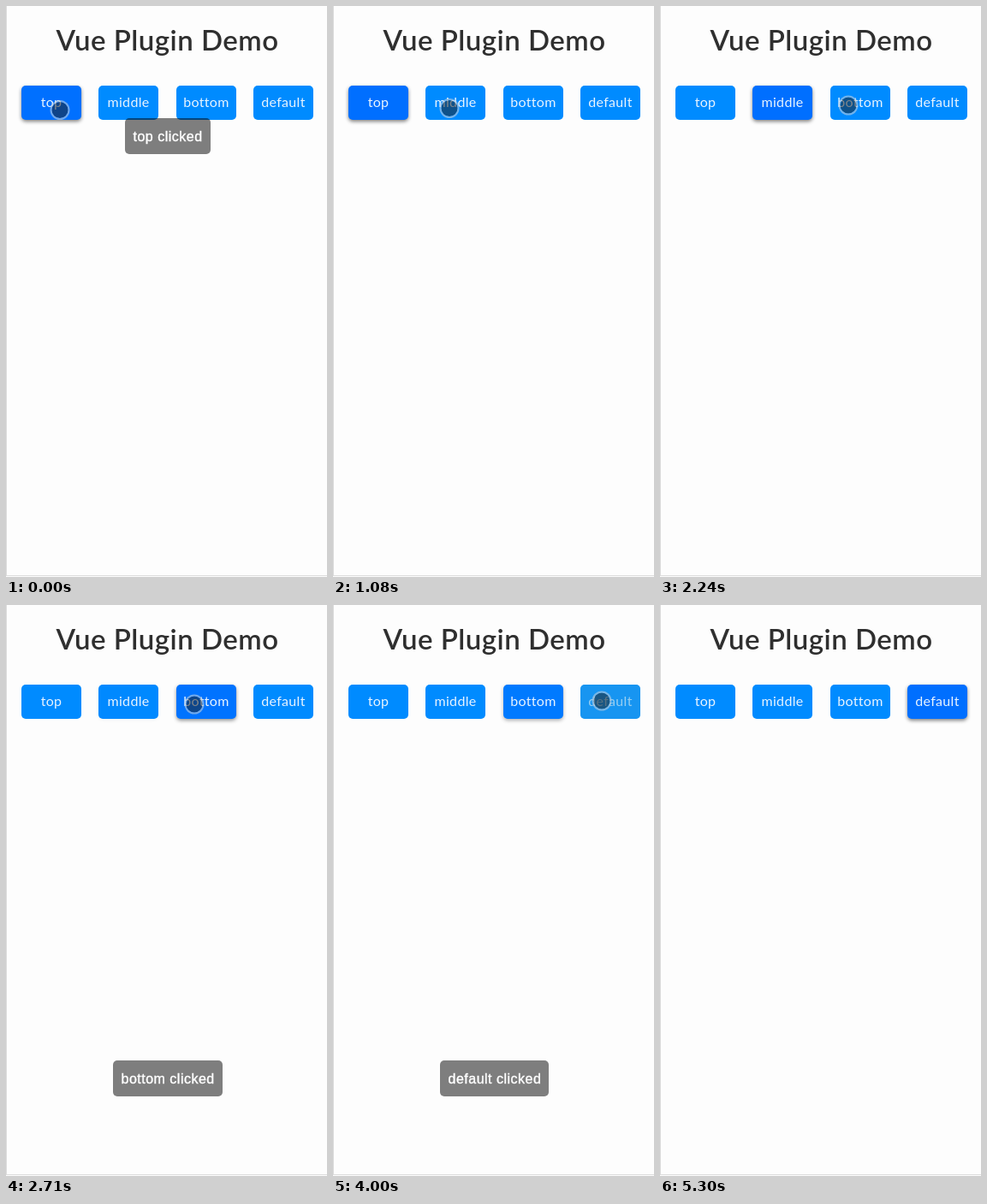
Animation, 375 px wide and 667 px high, one loop 5.9 s. Source, as an HTML page:

```html
<!DOCTYPE html>
<html lang="en">
<head>
<meta charset="utf-8">
<title>Vue Plugin Demo</title>
<style>
html, body { margin: 0; width: 100%; height: 100%; overflow: hidden; background: #fdfdfd; }
div, h1 { position: absolute; box-sizing: border-box; text-align: center; white-space: nowrap; }
#page { left: 0; top: 0; width: 375px; height: 666px; border: solid #dcdcdc; border-width: 0 0 1px 1px; }
h1 { left: 1px; top: 19px; width: 375px; margin: 0; color: #2f2f2f; font: 600 33px/40px Lato, sans-serif; letter-spacing: .5px; }
.button, #tap { top: 93px; width: 70px; height: 40px; border-radius: 5px; }
.button { color: #e8f4ff; font: 16px/38px Lato, sans-serif; letter-spacing: .3px; }
#tap { background: rgba(51, 160, 225, .45); }
#toast { height: 42px; padding: 0 9px 0 9.5px; border-radius: 5px; background: rgba(0, 0, 0, .5); color: #fff;
  font: 16px/43px "Liberation Sans", Arial, sans-serif; letter-spacing: .5px; -webkit-text-stroke: .4px #fff; }
#cursor { left: -12px; top: -12px; width: 23px; height: 23px; border-radius: 50%;
  background: rgba(30, 30, 30, .52); background-clip: padding-box; border: 2px solid rgba(190, 205, 220, .6); }
</style>
</head>
<body>
<div id="page"></div>
<h1>Vue Plugin Demo</h1>
<div id="tap"></div>
<div id="toast"></div>
<div id="cursor"></div>
<script>
const STEP = 118, STEPS = 50, LEAD = 14;
const TOAST_STEPS = 6, LEAVE = 45;
const $ = id => document.getElementById(id);

const items = [
  { name: 'top', press: -2, toastY: 131 },
  { name: 'middle', press: 11, toastY: 298 },
  { name: 'bottom', press: 22, toastY: 532 },
  { name: 'default', press: 34, toastY: 532 }
];

// Pointer key points: step, x, y.
const path = [
  [1, 63.5, 122], [5, 120.5, 116.5], [9, 136.5, 120], [13, 136.5, 120],
  [17, 197, 112.5], [19, 220.5, 116.5], [26, 220.5, 116.5], [31, 314.5, 112.5],
  [39, 314.5, 112.5], [42, 255, 512], [43, 255, 512], [44, 303, 651]
];

items.forEach((item, i) => {
  item.x = Math.round(18 + i * 271 / 3);
  item.el = document.createElement('div');
  item.el.className = 'button';
  item.el.textContent = item.name;
  item.el.style.left = item.x + 'px';
  $('tap').before(item.el);
});

function pointer(n) {
  const next = path.findIndex(p => p[0] > n);
  if (next < 1) return path.at(next).slice(1);
  const [t0, x0, y0] = path[next - 1], [t1, x1, y1] = path[next];
  const k = (n - t0) / (t1 - t0);
  return [x0 + (x1 - x0) * k, y0 + (y1 - y0) * k];
}

// Highlight rises after a press and decays once the next button is pressed.
function activity(i, n) {
  const age = n - items[i].press;
  const nextAge = i + 1 < items.length ? n - items[i + 1].press : -1;
  if (age < 0) return 0;
  return nextAge < 0 ? 1 - .15 ** age : .6 * .1 ** nextAge;
}

function draw(n) {
  items.forEach(({ el }, i) => {
    const a = activity(i, n);
    el.style.background = `rgb(0, ${Math.round(139 - 28 * a)}, 255)`;
    el.style.boxShadow = `0 2px 4px rgba(0, 0, 0, ${.5 * a})`;
  });

  const tapped = items.find(({ press }) => n === press);
  $('tap').hidden = !tapped;
  if (tapped) $('tap').style.left = tapped.x + 'px';

  const shown = items.find(({ press }) => n >= press && n < press + TOAST_STEPS);
  const toast = $('toast');
  toast.hidden = !shown;
  if (shown) {
    toast.textContent = shown.name + ' clicked';
    toast.style.top = shown.toastY + 'px';
    toast.style.left = Math.round(188.5 - toast.offsetWidth / 2) + 'px';
  }

  const [x, y] = pointer(n);
  $('cursor').hidden = n >= LEAVE;
  $('cursor').style.transform = `translate(${x}px, ${y}px)`;
}

const start = performance.now();
function tick() {
  const t = performance.now() - start;
  draw(Math.floor((t + LEAD) / STEP) % STEPS);
  requestAnimationFrame(tick);
}
tick();
</script>
</body>
</html>
```
